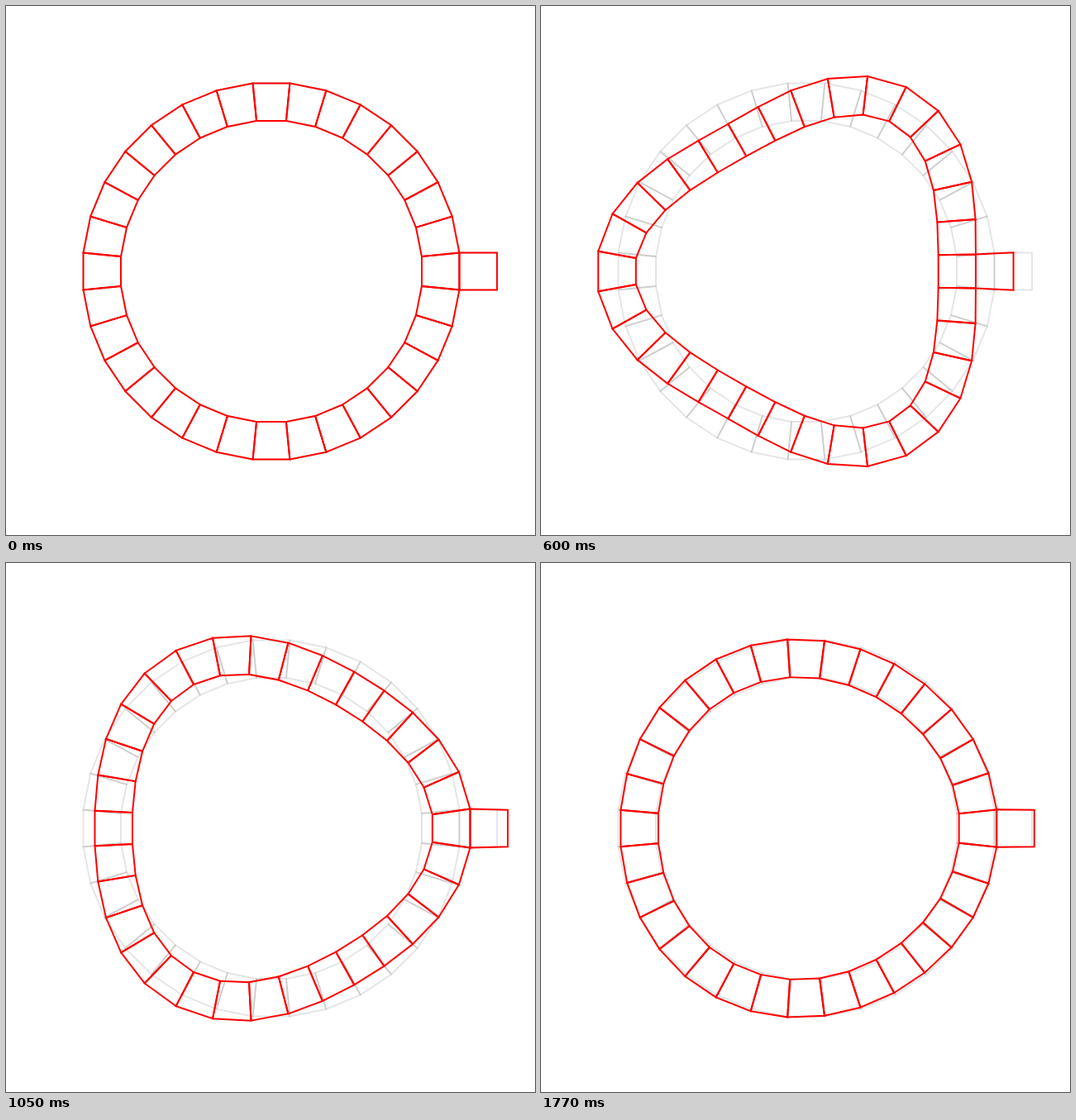
Recreate the animation shown at these times as an HTML page with a canvas. Size 640 px wide and 640 px high, loop 1800 ms.

```html
<!DOCTYPE html>
<html>
<head>
<meta charset="utf-8">
<title>Ring vibration mode</title>
<style>
html, body { margin: 0; width: 100%; height: 100%; overflow: hidden; background: #fff; }
canvas { display: block; }
</style>
</head>
<body>
<canvas id="stage" width="640" height="640"></canvas>
<script>
const ctx = document.getElementById("stage").getContext("2d");
const CENTER = 321, CELLS = 32, STEP = 2 * Math.PI / CELLS;
const PERIOD = 1800, TICK = 30;

// Mode shape as Fourier terms: radial cosines from order 0, tangential sines from order 1
const outer = { r: 227.5 / Math.cos(STEP / 2), radial: [-0.3, 1.15, 1.5, -29.5, -0.2], tangent: [-1.1, -0.55, 2.2] };
const inner = { r: 182 / Math.cos(STEP / 2), radial: [0, 1, 1.4, -28.7, -0.3], tangent: [-0.95, -0.85, 17.2] };

function ringPoint(ring, k, amp) {
  const a = (k + 0.5) * STEP, c = Math.cos(a), s = Math.sin(a);
  const u = ring.radial.reduce((sum, v, n) => sum + v * Math.cos(n * a), 0);
  const w = ring.tangent.reduce((sum, v, n) => sum + v * Math.sin((n + 1) * a), 0);
  const r = ring.r + amp * u, t = amp * w;
  return [CENTER + r * c - t * s, CENTER - r * s - t * c];
}

function strokeCell(points) {
  ctx.beginPath();
  points.forEach(p => ctx.lineTo(...p));
  ctx.closePath();
  ctx.stroke();
}

function drawMesh(amp, color) {
  ctx.strokeStyle = color;
  const cell = k => [
    ringPoint(inner, k - 1, amp), ringPoint(outer, k - 1, amp),
    ringPoint(outer, k, amp), ringPoint(inner, k, amp)
  ];
  for (let k = 0; k < CELLS; k++) strokeCell(cell(k));

  // Tab attached to the rightmost cell
  const x = CENTER + 273.1 - 26 * amp, h = 22.4 + 0.4 * amp;
  strokeCell([
    ringPoint(outer, -1, amp), [x, CENTER + h],
    [x, CENTER - h], ringPoint(outer, 0, amp)
  ]);
}

function draw() {
  const t = Math.floor(performance.now() % PERIOD / TICK) * TICK;
  ctx.fillStyle = "#fff";
  ctx.fillRect(0, 0, 640, 640);
  ctx.lineWidth = 2;
  drawMesh(0, "rgba(0,0,0,0.1)");
  drawMesh(Math.sin(2 * Math.PI * t / PERIOD), "#f00");
  requestAnimationFrame(draw);
}
draw();
</script>
</body>
</html>
```
